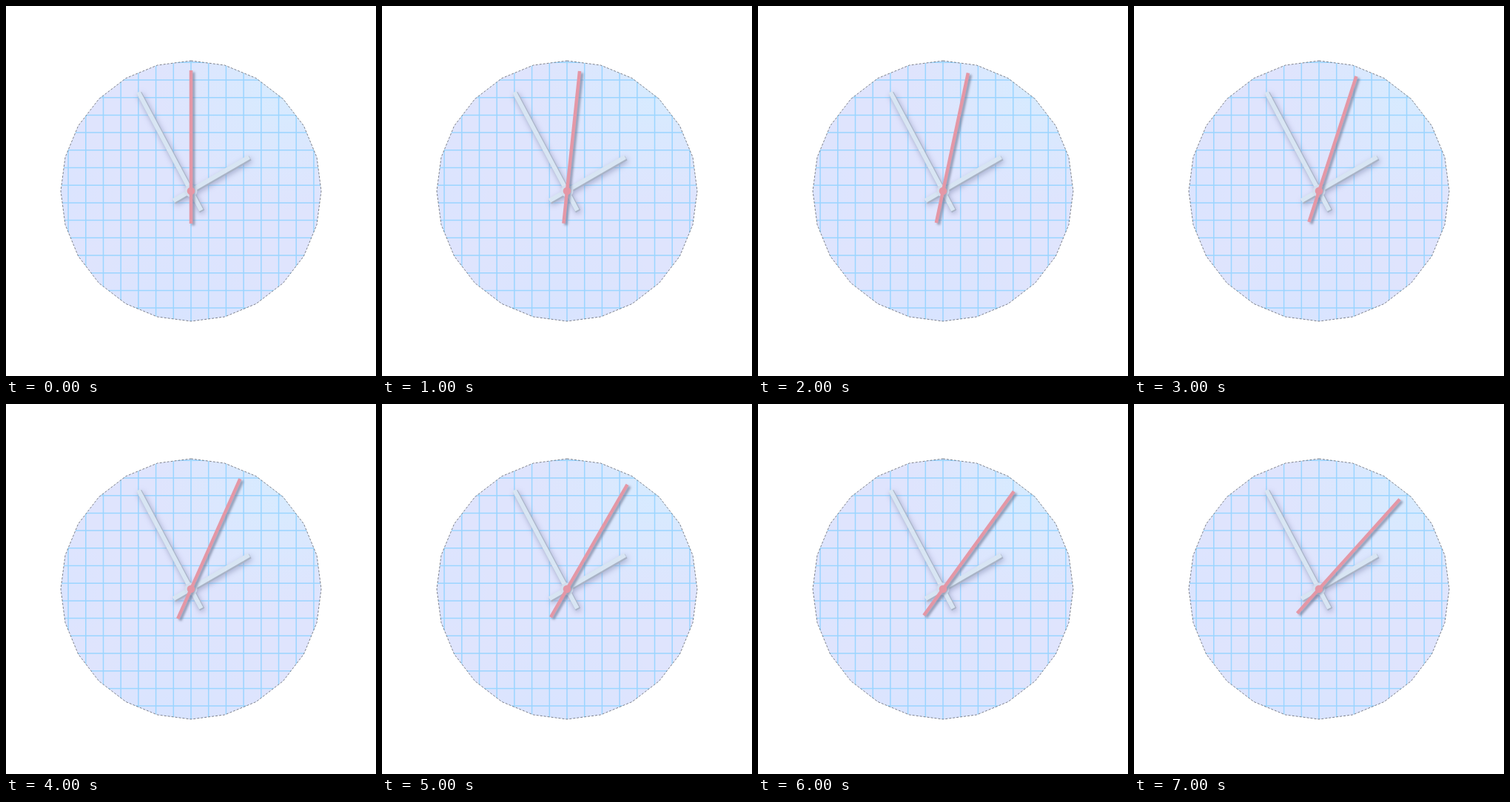
Write an HTML page with a canvas that moves like this. It is 500 px wide and 500 px high and loops after 8 s.

```html
<!DOCTYPE html>
<html lang="en">
<head>
<meta charset="utf-8">
<title>Clock</title>
<style>
  html, body { margin: 0; width: 100%; height: 100%; overflow: hidden; background: #fff; }
  canvas { display: block; }
</style>
</head>
<body>
<canvas width="500" height="500"></canvas>
<script>
const ctx = document.querySelector('canvas').getContext('2d');
const CENTER = 250, RADIUS = 176, SIDES = 24, CELL = 23.7;
const RAD = Math.PI / 180;

function facePath() {
  const path = new Path2D();
  for (let i = 0; i < SIDES; i++) {
    const a = i / SIDES * 2 * Math.PI;
    path.lineTo(CENTER + RADIUS * Math.sin(a), CENTER - RADIUS * Math.cos(a));
  }
  path.closePath();
  return path;
}
const face = facePath();

function glow(x, y, r, color) {
  const g = ctx.createRadialGradient(x, y, 0, x, y, r);
  g.addColorStop(0, color);
  g.addColorStop(1, color.slice(0, 7) + '00');
  ctx.fillStyle = g;
  ctx.fillRect(0, 0, 500, 500);
}

function drawFace() {
  ctx.save();
  ctx.clip(face);
  ctx.fillStyle = '#dfe4fd';
  ctx.fillRect(0, 0, 500, 500);
  glow(375, 110, 170, '#d6ebffff');
  glow(230, 430, 150, '#d8e4ffff');
  glow(80, 250, 90, '#dae4ffcc');
  ctx.strokeStyle = '#9bd5ff';
  ctx.lineWidth = 1.5;
  ctx.beginPath();
  for (let i = -8; i <= 8; i++) {
    const x = 250 + i * CELL, y = 242.2 + i * CELL;
    ctx.moveTo(x, 0);
    ctx.lineTo(x, 500);
    ctx.moveTo(0, y);
    ctx.lineTo(500, y);
  }
  ctx.stroke();
  ctx.restore();

  ctx.save();
  ctx.strokeStyle = '#50545c';
  ctx.lineWidth = 0.7;
  ctx.setLineDash([3, 2]);
  ctx.stroke(face);
  ctx.restore();
}

function bar(angle, length, tail, width, color, dx = 0, dy = 0) {
  const s = Math.sin(angle * RAD), c = Math.cos(angle * RAD);
  ctx.strokeStyle = color;
  ctx.lineWidth = width;
  ctx.beginPath();
  ctx.moveTo(CENTER + dx - tail * s, CENTER + dy + tail * c);
  ctx.lineTo(CENTER + dx + length * s, CENTER + dy - length * c);
  ctx.stroke();
}

function disc(r, color) {
  ctx.fillStyle = color;
  ctx.beginPath();
  ctx.arc(CENTER, CENTER, r, 0, 2 * Math.PI);
  ctx.fill();
}

function withShadow(color, blur, dx, dy, draw) {
  ctx.save();
  Object.assign(ctx, { shadowColor: color, shadowBlur: blur, shadowOffsetX: dx, shadowOffsetY: dy });
  draw();
  ctx.restore();
}

function whiteHand(angle, length, tail) {
  withShadow('#8088b0a0', 7, 1, 2, () => bar(angle, length, tail, 7, '#a9b3c6', 1, 1));
  bar(angle, length, tail, 6, '#d8e5f3', -0.3, -0.3);
}

function draw(now) {
  const seconds = Math.floor(now % 8000 / 1000);
  ctx.clearRect(0, 0, 500, 500);
  drawFace();
  whiteHand(60, 91, 27);
  whiteHand(-28, 151, 30);
  disc(8.5, '#d3deee');
  withShadow('#747c98b0', 3, 3, 2.5, () => bar(seconds * 6, 163, 44, 4.5, '#e497a6'));
  disc(5.3, '#e497a6');
  requestAnimationFrame(draw);
}
requestAnimationFrame(draw);
</script>
</body>
</html>
```
